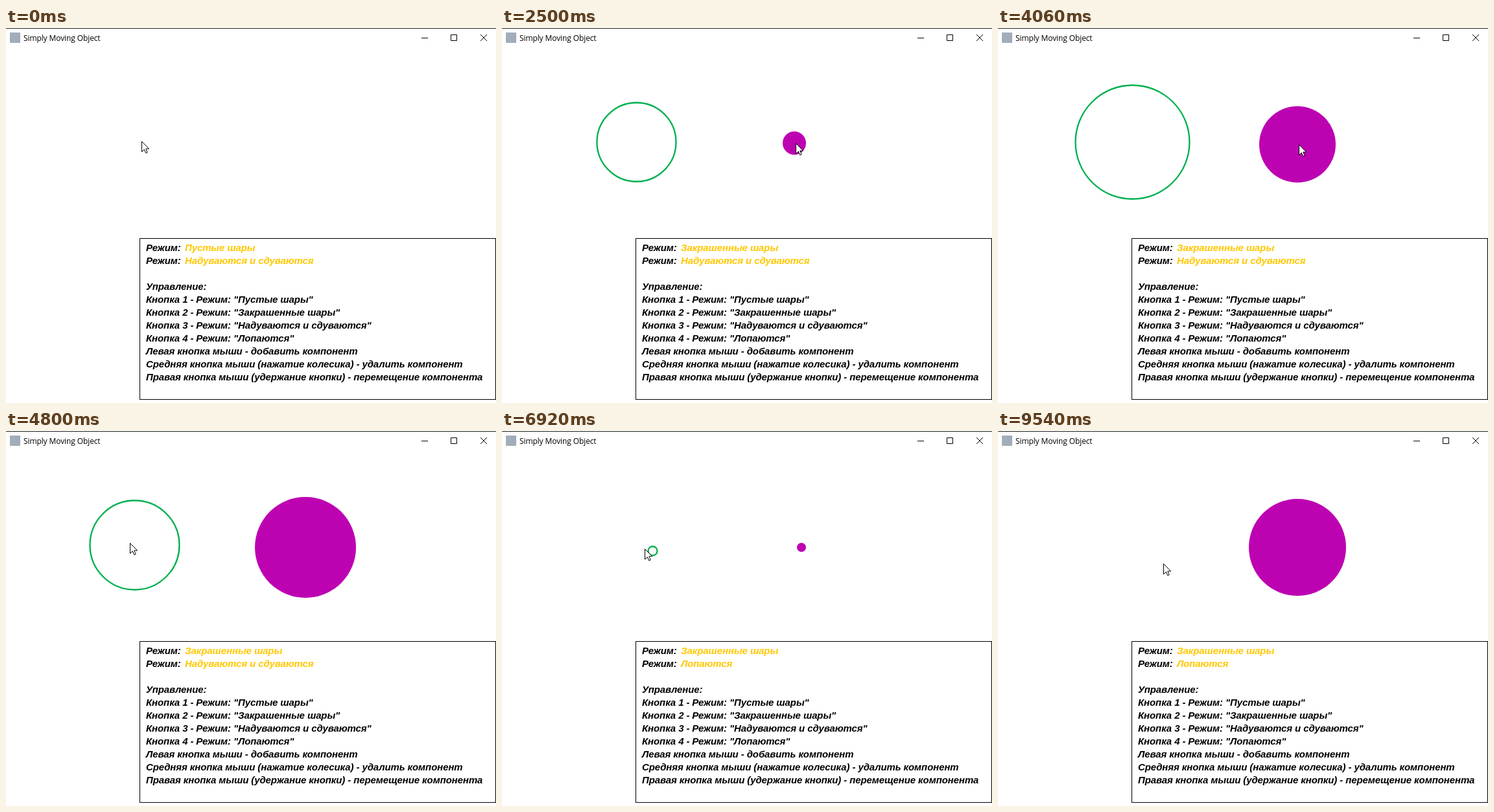
Write an HTML page that moves like this. It is 756 px wide and 580 px high and loops after 9.56 s.

```html
<!DOCTYPE html>
<html lang="ru">
<head>
<meta charset="utf-8">
<title>Simply Moving Object</title>
<style>
  html, body { margin: 0; width: 100%; height: 100%; overflow: hidden; background: #fff; }
  svg { display: block; }
  text { letter-spacing: -.11px; }
  .title { font: 12px "Open Sans", "Noto Sans", sans-serif; }
  .panel { font: italic bold 15px "Liberation Sans", Arial, sans-serif; }
  .mode { fill: #ffc800; }
  .line { fill: none; stroke: #000; }
</style>
</head>
<body>
<svg width="756" height="580" viewBox="0 0 756 580">
  <rect width="756" height="1" fill="#1c222b"/>
  <rect x="6" y="7" width="16" height="16" fill="#a3adb9"/>
  <text class="title" x="27" y="20">Simply Moving Object</text>
  <path class="line" d="M641 15.5h10M686.5 10.5h9v9h-9z"/>
  <path class="line" d="M732 10l10 10M742 10l-10 10"/>

  <circle id="ring" fill="none" stroke="#00b050" stroke-width="2.3"/>
  <circle id="disc" fill="#bd02b2"/>

  <rect x="206.5" y="325.5" width="549" height="249" fill="#fff" stroke="#000"/>
  <g class="panel" id="panel">
    <text class="mode" id="fillMode" x="276" y="345"></text>
    <text class="mode" id="sizeMode" x="276" y="365"></text>
  </g>
  <path id="cursor" fill="#fff" stroke="#000"
        d="M.5.5V16.5L4.3 12.9L6.8 18.5L9.2 17.5L6.8 11.9H11.7Z"/>
</svg>
<script>
const LOOP = 9560;
const STEP = 38.5;      // ms per pixel of radius
const MAX_R = 95;
const FILL_AT = 1000, POP_AT = 6650;

const $ = id => document.getElementById(id);

const lines = [
  'Режим:', 'Режим:', '', 'Управление:',
  'Кнопка 1 - Режим: "Пустые шары"',
  'Кнопка 2 - Режим: "Закрашенные шары"',
  'Кнопка 3 - Режим: "Надуваются и сдуваются"',
  'Кнопка 4 - Режим: "Лопаются"',
  'Левая кнопка мыши - добавить компонент',
  'Средняя кнопка мыши (нажатие колесика) - удалить компонент',
  'Правая кнопка мыши (удержание кнопки) - перемещение компонента'
];
lines.forEach((line, i) => {
  const el = document.createElementNS('http://www.w3.org/2000/svg', 'text');
  el.setAttribute('x', 216);
  el.setAttribute('y', 345 + 20 * i);
  el.textContent = line;
  $('panel').append(el);
});

// The pointer rests between these moves
const home = { x: 209, y: 175 };
const moves = [
  { from: 1000, to: 1560, x: 396, y: 170 },
  { from: 1560, to: 1740, x: 453, y: 178 },
  { from: 3030, to: 3220, x: 541, y: 177 },
  { from: 3220, to: 3900, x: 464, y: 180 },
  { from: 4050, to: 4550, x: 200, y: 173 },
  { from: 4600, to: 4800, x: 191, y: 173 },
  { from: 4800, to: 5600, x: 225, y: 182 },
  { from: 6500, to: 6900, x: 220, y: 182 },
  { from: 7600, to: 8660, x: 289, y: 219 },
  { from: 8660, to: 9300, x: 255, y: 205 }
];

const clamp = (v, lo, hi) => Math.min(Math.max(v, lo), hi);
const smooth = u => u * u * (3 - 2 * u);

function pointer(t) {
  let { x, y } = home;
  for (const m of moves) {
    const k = smooth(clamp((t - m.from) / (m.to - m.from), 0, 1));
    x += (m.x - x) * k;
    y += (m.y - y) * k;
  }
  return { x: Math.round(x), y: Math.round(y) };
}

// Balls swell to the limit and shrink; the popping mode starts them anew
function radius(t, born) {
  const n = Math.round((t - (t < POP_AT ? born : POP_AT)) / STEP);
  return MAX_R - Math.abs(MAX_R - n);
}

const balls = [
  { el: $('ring'), born: 140, shown: 180, gone: 9300, grab: 4580, drop: 5600, dx: 7.5, dy: 3.5 },
  { el: $('disc'), born: 1795, shown: 1795, gone: LOOP, grab: 3000, drop: 3900, dx: -2, dy: 0 }
];

function drawBall(b, t) {
  const p = pointer(clamp(t, b.grab, b.drop));
  const visible = t >= b.shown && t < b.gone;
  b.el.setAttribute('cx', p.x + b.dx);
  b.el.setAttribute('cy', p.y + b.dy);
  b.el.setAttribute('r', visible ? Math.max(0, radius(t, b.born)) : 0);
  b.el.setAttribute('visibility', visible ? 'visible' : 'hidden');
}

function draw(t) {
  balls.forEach(b => drawBall(b, t));
  const p = pointer(t);
  $('cursor').setAttribute('transform', `translate(${p.x} ${p.y})`);
  $('fillMode').textContent = t < FILL_AT ? 'Пустые шары' : 'Закрашенные шары';
  $('sizeMode').textContent = t < POP_AT ? 'Надуваются и сдуваются' : 'Лопаются';
}

const begin = performance.now();
function tick() {
  draw((performance.now() - begin) % LOOP);
  requestAnimationFrame(tick);
}
tick();
</script>
</body>
</html>
```
